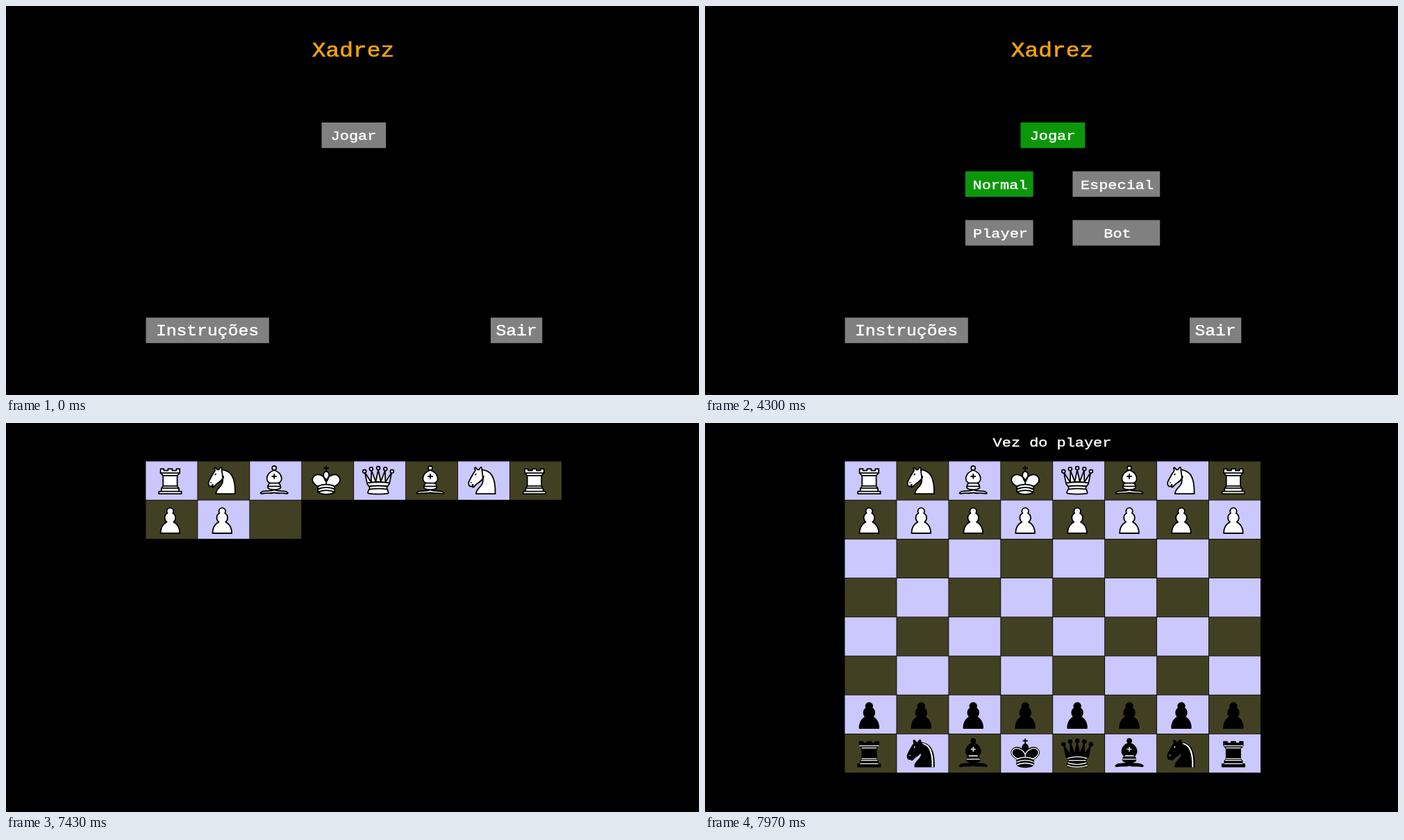
Animation of 998 by 561 pixels, one loop 8 s. Source, as an HTML page:

```html
<!DOCTYPE html>
<html lang="pt">
<head>
<meta charset="utf-8">
<title>Xadrez</title>
<style>
  html, body { margin: 0; width: 100%; height: 100%; overflow: hidden; background: #000; }
  svg { display: block; width: 100%; height: 100%; }
  text {
    font-family: "Liberation Mono", "Courier New", monospace;
    fill: currentColor; stroke: currentColor; stroke-width: .022em;
    color: #fff; text-anchor: middle;
  }
  .piece { stroke: #000; stroke-width: 1.5; stroke-linecap: round; stroke-linejoin: round; }
  .white { fill: #fff; }
  .black { fill: #000; }
  .line { fill: none; }
  .black .detail { stroke: #fff; stroke-width: 1.1; }
</style>
</head>
<body>
<svg id="stage" viewBox="0 0 998 561"></svg>
<script>
const LOOP = 8000;
const GREY = '#808080', GREEN = '#0a980a', LIGHT = '#cac8fc', DARK = '#414022';
const SMALL = 21.9, MEDIUM = 24.7, LARGE = 32.9;
const stage = document.getElementById('stage');

function add(parent, tag, attrs = {}, text = '') {
  const node = document.createElementNS('http://www.w3.org/2000/svg', tag);
  for (const key in attrs) node.setAttribute(key, attrs[key]);
  node.textContent = text;
  parent.append(node);
  return node;
}

// Low, wide letters like a typewriter face, standing on the baseline y
function label(parent, text, x, y, size, color = '#fff') {
  return add(parent, 'text', {
    transform: `translate(${x} ${y}) scale(1 .87)`,
    style: `font-size:${size}px;color:${color}`
  }, text);
}

const show = (node, on) => node.setAttribute('visibility', on ? 'visible' : 'hidden');

// Menu: label, x, y, width, text centre, font size, time shown, time selected
const menu = add(stage, 'g');
label(menu, 'Xadrez', 500, 73, LARGE, '#f0a30c');
const buttons = [
  ['Jogar', 454.5, 168, 92.7, 500.5, SMALL, 0, 2970],
  ['Normal', 375, 238.4, 97.6, 425, SMALL, 2970, 4100],
  ['Especial', 529.4, 238.4, 125.8, 593.5, SMALL, 2970, LOOP],
  ['Player', 375, 308.7, 97.6, 425.5, SMALL, 4100, LOOP],
  ['Bot', 529.4, 308.7, 125.8, 594, SMALL, 4100, 5830],
  ['Confirmar', 431, 379, 140, 500.5, SMALL, 5830, 6700],
  ['Instruções', 201.5, 449.4, 177.3, 290, MEDIUM, 0, LOOP],
  ['Sair', 698, 449.4, 74.3, 735, MEDIUM, 0, LOOP]
].map(([text, x, y, width, cx, size, shown, selected]) => {
  const group = add(menu, 'g');
  const box = add(group, 'rect', { x, y, width, height: 36.8 });
  label(group, text, cx, y + 25.2, size);
  return { group, box, shown, selected };
});

// Piece shapes on a 45 x 45 grid: body, outline strokes, inner detail
const shapes = {
  pawn: { body: 'M22.5 9c-2.2 0-4 1.8-4 4 0 .9.3 1.7.8 2.4C17.3 16.5 16 18.6 16 21c0 2 .9 3.8 2.4 5C15.4 27.1 11 31.6 11 39.5H34c0-7.9-4.4-12.4-7.4-13.5C28.1 24.8 29 23 29 21c0-2.4-1.3-4.5-3.3-5.6.5-.7.8-1.5.8-2.4 0-2.2-1.8-4-4-4z' },
  rook: {
    body: 'M9 39h27v-3H9zM12 36v-4h21v4zM12.5 32l1.5-2.5h17l1.5 2.5zM14 29.5V17h17v12.5zM14 17l-3-3V9h4v2h5V9h5v2h5V9h4v5l-3 3z',
    detail: 'M11 14h23',
    darkDetail: 'M12 35.5h21M13 31.5h19M14 29.5h17M14 16.5h17M11 14h23'
  },
  knight: {
    body: 'M22 10c10.5 1 16.5 8 16 29H15c0-9 10-6.5 8-21zM24 18c.4 2.9-5.5 7.4-8 9-3 2-2.8 4.3-5 4-1-.9 1.4-3 0-3-1 0 .2 1.2-1 2-1 0-4 1-4-4 0-2 6-12 6-12s1.9-1.9 2-3.5c-.7-1-.5-2-.5-3 1-1 3 2.5 3 2.5h2s.8-2 2.5-3c1 0 1 3 1 3',
    detail: 'M9 25.4v.2M14.8 15l-.6 1',
    darkDetail: 'M9 25.4v.2M14.8 15l-.6 1M24.5 11.2c8 1.5 12.6 9.3 11.9 28M25 11.5c7 2 11.3 9.5 10.7 27.7'
  },
  bishop: {
    body: 'M9 36c3.4-1 10.1.4 13.5-2 3.4 2.4 10.1 1 13.5 2 0 0 1.6.5 3 2-.7 1-1.6 1-3 .5-3.4-1-10.1.5-13.5-1-3.4 1.5-10.1 0-13.5 1-1.4.5-2.3.5-3-.5 1.4-1.5 3-2 3-2zM15 32c2.5 2.5 12.5 2.5 15 0 .5-1.5 0-2 0-2 0-2.5-2.5-4-2.5-4 5.5-1.5 6-11.5-5-15.5-11 4-10.5 14-5 15.5 0 0-2.5 1.5-2.5 4 0 0-.5.5 0 2zM25 8a2.5 2.5 0 1 1-5 0 2.5 2.5 0 1 1 5 0z',
    detail: 'M17.5 26h10M15 30h15M22.5 15.5v5M20 18h5'
  },
  king: {
    outline: 'M22.5 11.6V6M20 8h5',
    body: 'M22.5 25s4.5-7.5 3-10.5c0 0-1-2.5-3-2.5s-3 2.5-3 2.5c-1.5 3 3 10.5 3 10.5M12.5 37c5.5 3.5 14.5 3.5 20 0v-7s9-4.5 6-10.5c-4-6.5-13.5-3.5-16 4V27v-3.5c-2.5-7.5-12-10.5-16-4-3 6 6 10.5 6 10.5z',
    detail: 'M12.5 30c5.5-3 14.5-3 20 0M12.5 33.5c5.5-3 14.5-3 20 0M12.5 37c5.5-3 14.5-3 20 0',
    darkDetail: 'M32 29.5s8.5-4 6-9.6C34.2 14 25 18 22.5 24.5v2.1-2.1C20 18 10.9 14 7 19.9 4.5 25.5 13 29.5 13 29.5M12.5 30c5.5-3 14.5-3 20 0M12.5 33.5c5.5-3 14.5-3 20 0M12.5 37c5.5-3 14.5-3 20 0'
  },
  queen: {
    body: 'M9 26c8.5-1.5 21-1.5 27 0l2.5-12.5L31 25l-.3-14.1-5.2 13.6-3-14.5-3 14.5-5.2-13.6L14 25 6.5 13.5zM9 26c0 2 1.5 2 2.5 4 1 1.5 1 1 .5 3.5-1.5 1-1.5 2.5-1.5 2.5-1.5 1.5.5 2.5.5 2.5 6.5 1 16.5 1 23 0 0 0 1.5-1 0-2.5 0 0 .5-1.5-1-2.5-.5-2.5-.5-2 .5-3.5 1-2 2.5-2 2.5-4-8.5-1.5-18.5-1.5-27 0z',
    tips: [[6, 12], [14, 9], [22.5, 8], [31, 9], [39, 12]],
    detail: 'M11.5 30c3.5-1 18.5-1 22 0M12 33.5c6-1 15-1 21 0',
    darkDetail: 'M11 29c7-2.2 16-2.2 23 0M12.5 31.5h20M11.5 34.5c7 2.3 15 2.3 22 0M10.5 37.5c8 2.5 16 2.5 24 0'
  }
};

function drawPiece(parent, kind, side, x, y) {
  const shape = shapes[kind];
  const group = add(parent, 'g', { class: `piece ${side}`, transform: `translate(${x} ${y}) scale(1.2)` });
  const detail = side === 'black' && shape.darkDetail || shape.detail;
  if (shape.outline) add(group, 'path', { class: 'line', d: shape.outline });
  add(group, 'path', { d: shape.body });
  for (const [cx, cy] of shape.tips || []) add(group, 'circle', { cx, cy, r: 2 });
  if (detail) add(group, 'path', { class: 'line detail', d: detail });
  return group;
}

// Board: squares are laid one by one, each piece after its square
const BOARD_START = 7307, PIECE_TIME = 12, EMPTY_TIME = 2.1;
const backRank = ['rook', 'knight', 'bishop', 'king', 'queen', 'bishop', 'knight', 'rook'];
const board = add(stage, 'g');
const reveals = [];
let clock = BOARD_START;

for (let i = 0; i < 64; i++) {
  const row = i >> 3, col = i % 8;
  const x = 201.4 + col * 74.93, y = 55.4 + row * 56.2;
  const square = add(board, 'rect', {
    x, y, width: 74.1, height: 55.4, fill: (row + col) % 2 ? DARK : LIGHT
  });
  reveals.push([square, clock]);
  if (row > 1 && row < 6) {
    clock += EMPTY_TIME;
    continue;
  }
  const kind = row === 0 || row === 7 ? backRank[col] : 'pawn';
  clock += PIECE_TIME;
  reveals.push([drawPiece(board, kind, row < 2 ? 'white' : 'black', x + 8, y), clock]);
}
reveals.push([label(board, 'Vez do player', 500, 34, SMALL), clock]);

const MENU_END = 7200, FRAME = 100 / 3;

function render(time) {
  menu.setAttribute('display', time < MENU_END ? 'inline' : 'none');
  for (const { group, box, shown, selected } of buttons) {
    show(group, time >= shown);
    box.setAttribute('fill', time >= selected ? GREEN : GREY);
  }
  const stepped = Math.floor((time + 4) / FRAME) * FRAME;
  for (const [node, at] of reveals) show(node, stepped >= at);
}

const start = performance.now();
function tick() {
  render((performance.now() - start) % LOOP);
  requestAnimationFrame(tick);
}
tick();
</script>
</body>
</html>
```
